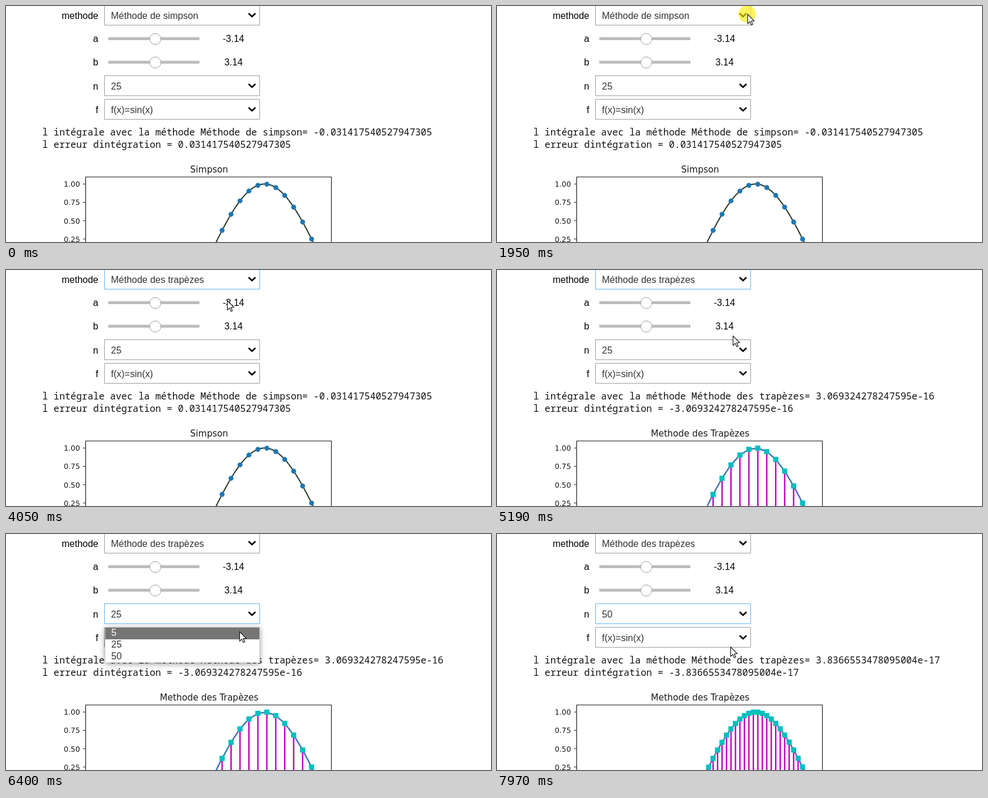
Recreate the animation shown at these times as an HTML page with a canvas. Size 825 by 401 pixels, loop 8000 ms.

```html
<!DOCTYPE html>
<html lang="fr">
<head>
<meta charset="utf-8">
<style>
  html, body { margin: 0; width: 100%; height: 100%; overflow: hidden; background: #fff; }
  canvas { display: block; }
</style>
</head>
<body>
<canvas id="stage" width="825" height="401"></canvas>
<script>
const ctx = document.getElementById('stage').getContext('2d');
const LOOP = 8000;
const SANS = '16px "Liberation Sans", Arial, sans-serif';
const MONO = '16.03px "Noto Sans Mono", monospace';
const plotFont = size => `${size}px "DejaVu Sans", sans-serif`;

const METHODS = ['Méthode des trapèzes', 'Méthode des rectangles', 'Méthode de simpson', 'Méthode du point milieu'];
const COUNTS = ['5', '25', '50'];

// Pointer moves: first step time, last step time, steps, target x, target y
const MOVES = [
  [330, 330, 1, 709, 385], [400, 400, 1, 593, 233],
  [730, 730, 1, 560, 182], [800, 800, 1, 529, 132],
  [1060, 1680, 10, 426, 14],
  [2740, 3090, 6, 391, 38], [3160, 3460, 5, 378, 52], [3590, 3590, 1, 376, 52],
  [4650, 5390, 11, 411, 134], [5460, 5530, 2, 415, 134],
  [6260, 6260, 1, 410, 147], [6330, 6760, 7, 365, 213],
  [7490, 7970, 8, 397, 192]
];
const CLICKS = [[1820, 2150], [3850, 4050], [5800, 6000], [7020, 7230]];
const during = (t, from, to) => t >= from && t < to;

function pointerAt(t) {
  let x = 709, y = 385;
  for (const [start, end, steps, toX, toY] of MOVES) {
    if (t < start) break;
    const gap = (end - start) / (steps - 1) || 1;
    const done = Math.min(steps, Math.floor((t - start) / gap + 0.05) + 1) / steps;
    x += (toX - x) * done;
    y += (toY - y) * done;
  }
  return { x: Math.round(x), y: Math.round(y) };
}

function text(str, x, y, font = SANS, color = '#000', align = 'left') {
  ctx.font = font;
  ctx.fillStyle = color;
  ctx.textAlign = align;
  ctx.fillText(str, x, y);
}

function path(points, close) {
  ctx.beginPath();
  points.forEach(([x, y]) => ctx.lineTo(x, y));
  if (close) ctx.closePath();
}

function stroke(color, width) {
  ctx.strokeStyle = color;
  ctx.lineWidth = width;
  ctx.stroke();
}

function disc(x, y, r, color) {
  ctx.beginPath();
  ctx.arc(x, y, r, 0, 2 * Math.PI);
  ctx.fillStyle = color;
  ctx.fill();
}

function select(label, value, top, focused) {
  text(label, 157, top + 24, SANS, '#000', 'right');
  ctx.beginPath();
  ctx.rect(167.5, top + 0.5, 264, 34);
  stroke(focused ? '#64b5f6' : '#9e9e9e', 1);
  text(value, 178.5, top + 24, SANS, '#333');
  path([[412.7, top + 14.5], [418.5, top + 20], [424.3, top + 14.5]]);
  stroke('#000', 2.6);
}

function slider(label, value, y) {
  text(label, 157, y + 5, SANS, '#000', 'right');
  ctx.fillStyle = '#bdbdbd';
  ctx.fillRect(174, y - 3, 155, 5);
  disc(254, y, 9.5, '#fff');
  stroke('#9e9e9e', 1);
  text(value, 387, y + 5, SANS, '#000', 'center');
}

function dropdown(options, selected, top, pointer) {
  const rowHeight = 20.2;
  const height = Math.ceil(options.length * rowHeight);
  ctx.save();
  ctx.shadowColor = 'rgba(0,0,0,.4)';
  ctx.shadowBlur = 9;
  ctx.shadowOffsetY = 2;
  ctx.fillStyle = '#fff';
  ctx.fillRect(168, top, 264, height);
  ctx.restore();
  ctx.beginPath();
  ctx.rect(168.5, top + 0.5, 263, height - 1);
  stroke('#ccc', 1);
  const hovered = Math.floor((pointer.y - top - 0.5) / rowHeight);
  const active = hovered >= 0 ? hovered : selected;
  options.forEach((option, i) => {
    const y = top + 0.5 + i * rowHeight;
    if (i === active) {
      ctx.fillStyle = '#757575';
      ctx.fillRect(169, Math.round(y), 262, 20);
    }
    text(option, 179, Math.round(y + 14.4), SANS, i === active ? '#fff' : '#333');
  });
}

function plot(simpson, n) {
  const plotX = v => 154.5 + (v + 3.14) / 6.28 * 380.5;
  const plotY = v => 302.5 + (1 - v) * 124.6;
  const samples = count => Array.from({ length: count + 1 }, (_, i) => {
    const v = -3.14 + 6.28 * i / count;
    return [plotX(v), plotY(Math.sin(v))];
  });

  text(simpson ? 'Simpson' : 'Methode des Trapèzes', 345.5, 283, plotFont(15), '#1a1a1a', 'center');
  for (const v of [1, 0.75, 0.5, 0.25]) {
    const y = plotY(v);
    path([[131, y], [135.5, y]]);
    stroke('#222', 1);
    text(v.toFixed(2), 126, y + 4.7, plotFont(12.5), '#1a1a1a', 'right');
  }

  const points = samples(n);
  if (!simpson) {
    for (const [x, y] of points) {
      path([[x, y], [x, plotY(0)]]);
      stroke('#bf00bf', 2.4);
    }
  }
  path(samples(simpson ? 200 : n));
  stroke(simpson ? '#273827' : '#4475b3', simpson ? 2 : 2.5);
  for (const [x, y] of points) {
    if (simpson) disc(x, y, 4.2, '#1f77b4');
    else {
      ctx.fillStyle = '#00bfbf';
      ctx.fillRect(x - 4.4, y - 4.4, 8.8, 8.8);
    }
  }
  ctx.beginPath();
  ctx.rect(135.5, 290.5, 418, 274);
  stroke('#222', 1.2);
}

function arrow({ x, y }) {
  ctx.save();
  ctx.translate(x + 0.5, y);
  path([[0, 0], [0, 16], [3.7, 12.6], [6.2, 18.2], [8.6, 17.2], [6.2, 11.7], [11, 11.4]], true);
  ctx.fillStyle = '#fff';
  ctx.fill();
  stroke('#111', 1.1);
  ctx.restore();
}

function draw(t) {
  const pointer = pointerAt(t);
  const simpson = t < 4380;
  const n = t < 7490 ? 25 : 50;

  ctx.fillStyle = '#fff';
  ctx.fillRect(0, 0, 825, 401);
  select('methode', METHODS[t < 4050 ? 2 : 0], -2, during(t, 2020, 5800));
  slider('a', '-3.14', 56);
  slider('b', '3.14', 96);
  select('n', t < 7230 ? '25' : '50', 118, t >= 5800);
  select('f', 'f(x)=sin(x)', 158, false);

  const value = simpson ? '-0.031417540527947305'
    : n === 25 ? '3.069324278247595e-16' : '3.8366553478095004e-17';
  const error = simpson ? value.slice(1) : '-' + value;
  text(`l intégrale avec la méthode ${METHODS[simpson ? 2 : 0]}= ${value}`, 61.8, 220, MONO, '#111');
  text(`l erreur dintégration = ${error}`, 61.8, 241, MONO, '#111');
  plot(simpson, n);

  if (during(t, 2020, 4050)) dropdown(METHODS, 2, 38, pointer);
  if (during(t, 5800, 7230)) dropdown(COUNTS, 1, 158, pointer);
  if (CLICKS.some(([from, to]) => during(t, from, to))) {
    disc(pointer.x - 0.5, pointer.y - 0.5, 14.8, 'rgba(250,238,0,.62)');
  }
  if (t >= 330) arrow(pointer);
}

const begin = performance.now();
function tick() {
  draw((performance.now() - begin) % LOOP);
  requestAnimationFrame(tick);
}
tick();
</script>
</body>
</html>
```
